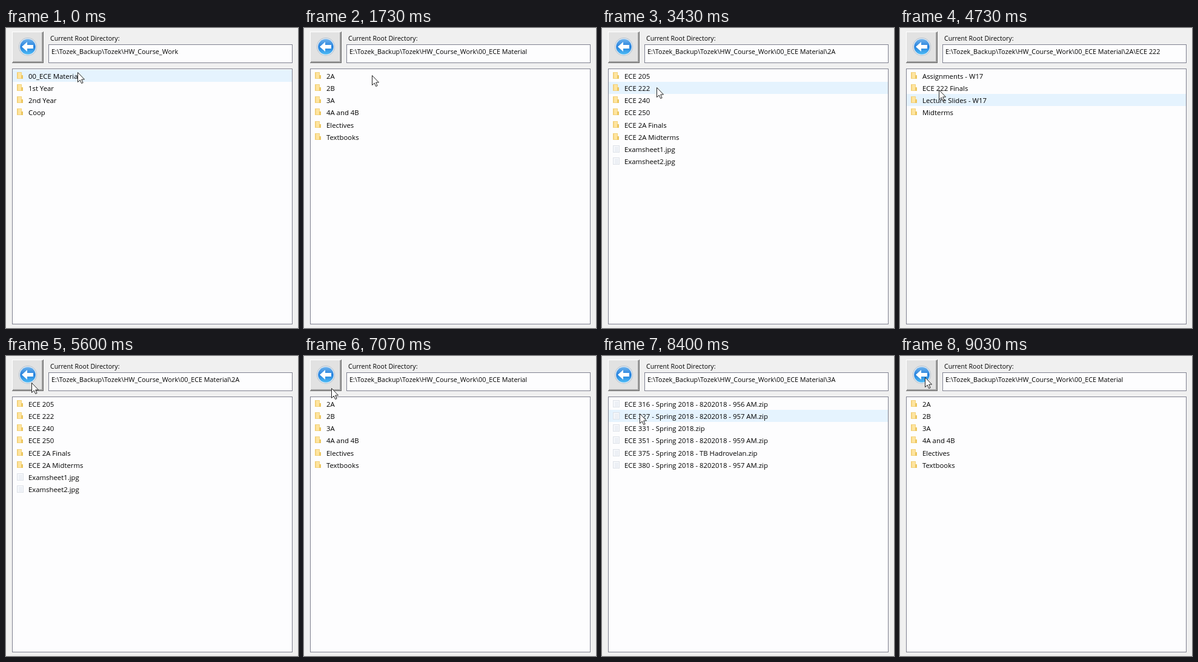
Animation of 482x496 px, one loop 9060 ms. Source, as an HTML page with a canvas:

```html
<!DOCTYPE html>
<html lang="en">
<head>
<meta charset="utf-8">
<title>Directory browser</title>
<style>
  html, body { margin: 0; width: 100%; height: 100%; overflow: hidden; background: #f0f0f0; }
  canvas { display: block; }
</style>
</head>
<body>
<canvas id="stage" width="482" height="496"></canvas>
<script>
const ctx = document.getElementById('stage').getContext('2d');
const LOOP = 9060;
const ROW_TOP = 69, ROW_HEIGHT = 20.15;
const HOVER_LAG = 40;
const ROOT = 'E:\\Tozek_Backup\\Tozek\\HW_Course_Work';

const zipName = (course, note) => `ECE ${course} - Spring 2018${note}.zip`;
const stamp = minute => ` - 8202018 - ${minute} AM`;

const folders = {
  root: { path: '', items: ['00_ECE Material', '1st Year', '2nd Year', 'Coop'] },
  material: {
    path: '\\00_ECE Material',
    items: ['2A', '2B', '3A', '4A and 4B', 'Electives', 'Textbooks']
  },
  term2A: {
    path: '\\00_ECE Material\\2A',
    items: ['ECE 205', 'ECE 222', 'ECE 240', 'ECE 250', 'ECE 2A Finals',
      'ECE 2A Midterms', 'Examsheet1.jpg', 'Examsheet2.jpg']
  },
  course: {
    path: '\\00_ECE Material\\2A\\ECE 222',
    items: ['Assignments - W17', 'ECE 222 Finals', 'Lecture Slides - W17', 'Midterms']
  },
  term3A: {
    path: '\\00_ECE Material\\3A',
    items: [zipName(316, stamp(956)), zipName(327, stamp(957)), zipName(331, ''),
      zipName(351, stamp(959)), zipName(375, ' - TB Hadrovelan'), zipName(380, stamp(957))]
  }
};

const visits = [
  { at: 0, name: 'root' },
  { at: 1450, name: 'material' },
  { at: 2650, name: 'term2A' },
  { at: 4060, name: 'course' },
  { at: 5450, name: 'term2A' },
  { at: 6050, name: 'material' },
  { at: 7750, name: 'term3A' },
  { at: 8900, name: 'material' }
];

// The pointer rests between eased moves.
const onRow = (x, row) => ({ x, y: ROW_TOP + 9 + row * ROW_HEIGHT });
const start = { x: 118, y: 73 };
const moves = [
  { at: 200, span: 900, to: onRow(112, 0) },
  { at: 1740, span: 500, to: onRow(88, 0) },
  { at: 3100, span: 330, to: onRow(90, 1) },
  { at: 4200, span: 420, to: onRow(74, 2.5) },
  { at: 4620, span: 300, to: { x: 42, y: 44 } },
  { at: 6980, span: 420, to: onRow(70, 2) },
  { at: 8280, span: 350, to: { x: 41, y: 35 } }
];

const mix = (a, b, k) => a + (b - a) * k;

function ease(k) {
  const c = Math.min(1, Math.max(0, k));
  return c * c * (3 - 2 * c);
}

function pointerAt(time) {
  return moves.reduce((p, { at, span, to }) => {
    const k = ease((time - at) / span);
    return { x: mix(p.x, to.x, k), y: mix(p.y, to.y, k) };
  }, start);
}

// A freshly opened folder has no hovered row until the pointer moves.
function hoveredRow(time, openedAt, count) {
  const p = pointerAt(time - HOVER_LAG);
  const opened = pointerAt(openedAt);
  if (openedAt > 0 && Math.hypot(p.x - opened.x, p.y - opened.y) < 1) return -1;
  const row = Math.floor((p.y - ROW_TOP) / ROW_HEIGHT);
  return row < count ? row : -1;
}

function fill(color, x, y, w, h) {
  ctx.fillStyle = color;
  ctx.fillRect(x, y, w, h);
}

function text(value, x, y, size) {
  ctx.font = `${size}px "Open Sans", "Noto Sans", sans-serif`;
  ctx.fillStyle = '#000';
  ctx.fillText(value, x, y);
}

function box(x, y, w, h) {
  fill('#7f8190', x, y, w, h);
  fill('#fdfdfe', x + 1, y + 1, w - 2, h - 2);
}

function disc(radius, color) {
  ctx.beginPath();
  ctx.arc(36, 31, radius, 0, Math.PI * 2);
  ctx.fillStyle = color;
  ctx.fill();
}

function backButton() {
  fill('#696969', 10, 6, 52, 52);
  fill('#ffffff', 10, 6, 51, 51);
  fill('#a0a0a0', 11, 7, 50, 50);
  fill('#e2e2e2', 11, 7, 48, 48);

  const blue = ctx.createLinearGradient(0, 18, 0, 44);
  blue.addColorStop(0, '#6fb4ee');
  blue.addColorStop(0.5, '#2580dc');
  blue.addColorStop(1, '#4fbdf6');
  disc(15, '#b4c0cc');
  disc(14, '#e6eef6');
  disc(12.8, blue);

  const arrow = new Path2D('M26 31 l9 -8 v5 h10 v6 h-10 v5 z');
  ctx.fillStyle = '#fff';
  ctx.fill(arrow);
}

function folderIcon(y) {
  fill('#f3d27c', 18, y, 8, 11);
  fill('#ffe5a0', 20, y + 1, 5, 9);
  fill('#ecc660', 25, y + 5, 3, 6);
}

function fileIcon(y) {
  fill('#dde1e8', 18, y, 11, 12);
  fill('#f6f8fb', 19, y + 1, 9, 10);
  for (let line = 3; line < 10; line += 2) fill('#e3e8f0', 21, y + line, 6, 1);
}

function pointer({ x, y }) {
  const shape = new Path2D('M0 0 v16 l3.7 -3.5 l2.5 5.5 l2.4 -1 l-2.4 -5.5 h4.8 z');
  ctx.save();
  ctx.translate(Math.round(x) + 0.5, Math.round(y) + 0.5);
  ctx.fillStyle = '#fff';
  ctx.fill(shape);
  ctx.strokeStyle = '#222';
  ctx.stroke(shape);
  ctx.restore();
}

function draw(time) {
  const { at, name } = visits.filter(visit => visit.at <= time).pop();
  const { path, items } = folders[name];

  fill('#f0f0f0', 0, 0, 482, 496);
  backButton();
  text('Current Root Directory:', 73, 21, 10.6);
  box(70, 27, 403, 31);
  text(ROOT + path, 75, 42.5, 10.8);
  box(10, 67, 463, 423);

  const rowTop = row => Math.round(ROW_TOP + row * ROW_HEIGHT);
  const hovered = hoveredRow(time, at, items.length);
  if (hovered >= 0) fill('#e5f3fe', 11, rowTop(hovered), 461, 20);

  items.forEach((item, row) => {
    const icon = /\.(zip|jpg)$/.test(item) ? fileIcon : folderIcon;
    icon(rowTop(row) + 4);
    text(item, 37, rowTop(row) + 15, 11.35);
  });

  pointer(pointerAt(time));
}

const started = performance.now();
function tick() {
  draw((performance.now() - started) % LOOP);
  requestAnimationFrame(tick);
}
tick();
</script>
</body>
</html>
```
